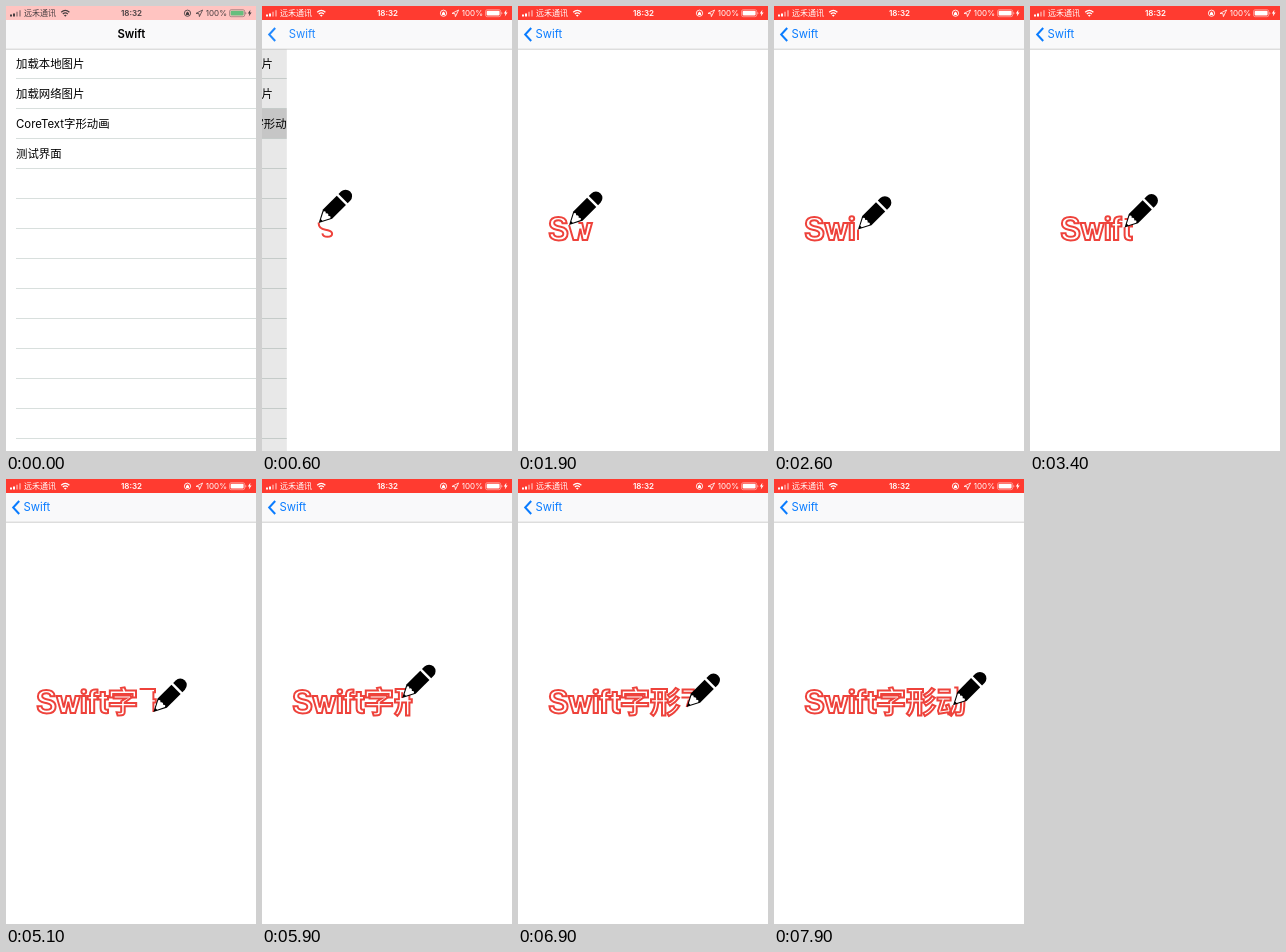
An HTML page for the animation above (8000 ms loop, 250 by 445 pixels).

```html
<!DOCTYPE html>
<html lang="zh-CN">
<head>
<meta charset="utf-8">
<title>Glyph drawing</title>
<style>
html, body { margin: 0; width: 100%; height: 100%; overflow: hidden; background: #fff; }
svg { display: block; width: 100%; height: 100%; font-family: Inter, "Noto Sans CJK SC", "Noto Sans CJK", sans-serif; }
#list text { font-size: 11.4px; }
#nav text { font-size: 11.3px; }
#status { font-size: 8px; fill: currentColor; }
#glyphs path { fill: none; stroke: #ee423b; stroke-width: 2; }
</style>
</head>
<body>
<svg viewBox="0 0 250 445">
  <g id="list">
    <rect y="43" width="250" height="402" fill="#fff"/>
    <rect id="pressed" y="103" width="250" height="30" fill="#d9d9d9"/>
    <g id="lines" stroke="#d8dfdd"></g>
    <text x="10" y="62">加载本地图片</text>
    <text x="10" y="92">加载网络图片</text>
    <text x="10" y="122">CoreText字形动画</text>
    <text x="10" y="152">测试界面</text>
  </g>
  <rect id="dim" y="43" width="250" height="402"/>

  <g id="page">
    <rect y="43" width="250" height="402" fill="#fff"/>
    <g id="glyphs">
      <!-- S -->
      <path d="M35.6 227.3C36 229.6 38 230.8 40.6 230.8C43.6 230.8 45.3 229.6 45.3 227.7C45.3 225.9 44 225 41 224.3L38.6 223.8C34 222.8 31.9 220.9 31.9 217.4C31.9 213.4 35.2 210.9 40.3 210.9C45.3 210.9 48.5 213.4 48.7 217.2H44.5C44.2 215.4 42.7 214.3 40.3 214.3C37.7 214.3 36.2 215.4 36.2 217.1C36.2 218.7 37.4 219.6 40.4 220.2L42.8 220.7C47.5 221.7 49.6 223.8 49.6 227.4C49.6 231.8 46.2 234.4 40.6 234.4C35.1 234.4 31.6 231.7 31.4 227.3Z"/>
      <!-- w -->
      <path d="M60.4 217H64.2L66.9 228.6L69.5 217H74L69.2 234H64.7L62.3 222.8L59.9 234H55.4L50.5 217H55.1L57.8 228.6Z"/>
      <!-- i -->
      <path d="M75.7 217H79.9V234H75.7Z"/>
      <path d="M75.4 212.6a2.4 2.4 0 0 1 4.8 0a2.4 2.4 0 0 1 -4.8 0Z"/>
      <!-- f -->
      <path d="M84 234V220.4H81.6V217H84V215.6C84 212 86 210.4 89.3 210.4C90.2 210.4 91 210.5 91.5 210.6V213.7C91.1 213.6 90.6 213.6 90.1 213.6C88.8 213.6 88.2 214.2 88.2 215.5V217H91.4V220.4H88.2V234Z"/>
      <!-- t -->
      <path d="M94.6 213H98.9V217H102V220.4H98.9V228.6C98.9 230 99.6 230.8 100.9 230.8L102 230.7V234C101.5 234.1 100.7 234.2 99.7 234.2C96 234.2 94.6 232.7 94.6 229.3V220.4H92.3V217H94.6Z"/>
      <!-- 字 -->
      <path d="M115 209L118.6 208.3L119.8 211.6H130V218.6H126.6V214.9H107.2V218.6H103.8V211.6H116Z"/>
      <path d="M103.6 227.2V224H115.2V222.2L119.6 219.6H107.6V216.6H124.6L125.4 218.6L118.7 223.4V224H130.2V227.2H118.7V233C118.7 236 117.6 236.6 111.6 236.4L110.6 233.3C114.6 233.5 115.2 233.4 115.2 232.4V227.2Z"/>
      <!-- 形 -->
      <path d="M133.6 210H149V213.2H147.4V220.2H149.8V223.4H147.4V236.4H144V223.4H140.2C140 229.5 138.6 233.4 135.4 236.8L132.8 234.6C135.5 231.8 136.6 228.6 136.8 223.4H133V220.2H136.9V213.2H133.6Z"/>
      <path d="M140.2 213.2V220.2H144V213.2Z"/>
      <path d="M157.6 209L160.6 210.6C158.4 213.8 155 216.6 151.6 218.4L149.8 215.8C153 214.2 156 211.7 157.6 209Z"/>
      <path d="M158 217.2L161 218.8C158.8 222 155.4 224.8 152 226.6L150.2 224C153.4 222.4 156.4 219.9 158 217.2Z"/>
      <path d="M158.4 225.6L161.4 227C158.6 231.6 155 235 150.8 237L149.2 234.2C153.2 232.4 156.6 229.4 158.4 225.6Z"/>
      <!-- 动 -->
      <path d="M164.6 210.6H175.8V213.8H164.6Z"/>
      <path d="M163.4 218.4H176.6V221.6H170.6L167.6 231.2L173.2 230.4L171.8 226.4L174.6 225.4L177.4 234.2L174.4 235.2L173.9 233.3L164.8 234.8L164 231.8L167.2 221.6H163.4Z"/>
      <path d="M180.2 208.4H183.5V214.6H190.6C190.5 226 190.2 231.6 189.4 234C188.6 236.6 187 236.8 182.2 236.4L181.4 233.2C185.4 233.5 186 233.4 186.4 232.2C186.9 230.2 187.1 226 187.2 217.8H183.4C183 227 181.4 232.6 177.2 237L174.6 234.8C178.4 230.8 179.7 226 180.1 217.8H176.8V214.6H180.2Z"/>
    </g>
    <g id="pen">
      <g transform="rotate(-45)">
        <path d="M0 0L12.5 -6.5H32V6.5H12.5Z"/>
        <path d="M4.2 -1L11.6 -4.8Q14.2 -3.6 11.8 -1.8Q14.4 0 11.8 1.8Q14.2 3.6 11.6 4.8L4.2 1Z" fill="#fff"/>
        <path d="M34.5 -6.5H38A6.5 6.5 0 0 1 38 6.5H34.5Z"/>
      </g>
    </g>
  </g>

  <g id="nav">
    <rect y="14" width="250" height="29" fill="#f9f9fa"/>
    <path d="M0 43.2H250" stroke="#b9b9bb" stroke-width=".7"/>
    <path id="chevron" d="M13.2 22L7.2 28.5L13.2 35" fill="none" stroke="#0a7cff" stroke-width="2"/>
    <g id="label">
      <text id="title" y="32.4" font-weight="600">Swift</text>
      <text id="back" y="32.4" fill="#0a7cff">Swift</text>
    </g>
  </g>

  <rect id="bar" width="250" height="14"/>
  <g id="status">
    <path d="M4 8.6h2v2h-2zM7 7.4h2v3.2h-2z"/>
    <path d="M10 5.8h2v4.8h-2zM13 4.2h2v6.4h-2z" opacity=".4"/>
    <text x="18" y="10.2">远禾通讯</text>
    <g fill="none" stroke="currentColor" stroke-width="1.2">
      <path d="M55.2 6.2Q59.3 2.4 63.4 6.2M56.8 8Q59.3 5.7 61.8 8"/>
      <circle cx="181.5" cy="7.2" r="3.1" stroke-width=".9"/>
    </g>
    <path d="M57.9 9.3Q59.3 8.1 60.7 9.3L59.3 10.8Z"/>
    <path d="M180 6.8h3v2.2h-3zM180.7 6.8v-1h1.6v1z"/>
    <path d="M190 7.4L196.6 4L193.4 10.6L193 7.7Z" fill="none" stroke="currentColor" stroke-width=".8"/>
    <text x="125.5" y="10.1" text-anchor="middle" font-weight="600">18:32</text>
    <text x="221" y="10.1" text-anchor="end">100%</text>
    <rect x="223.5" y="3.7" width="15.2" height="7" rx="1.8" fill="none" stroke="currentColor" stroke-width=".7" opacity=".6"/>
    <path d="M239.4 6v2.4q1 -.3 1 -1.2t-1 -1.2z" opacity=".6"/>
    <rect id="charge" x="224.6" y="4.8" width="13" height="4.8" rx="1"/>
    <path d="M244.4 3.8L241.8 7.6H243.4L242.8 10.6L245.6 6.6H244Z"/>
  </g>
</svg>
<script>
const LOOP = 8000, STEP = 100;
const $ = id => document.getElementById(id);
const clamp = v => Math.min(1, Math.max(0, v));
const mix = (a, b, p) => `rgb(${a.map((v, i) => Math.round(v + (b[i] - v) * p))})`;
const shift = (id, x, y = 0) => $(id).setAttribute("transform", `translate(${x} ${y})`);

const WHITE = [255, 255, 255], RED = [255, 59, 48], DARK = [70, 62, 64], GREEN = [104, 190, 126];

$("lines").innerHTML = Array.from({ length: 13 }, (_, i) =>
  `<path d="M10 ${72.5 + 30 * i}H250"/>`).join("");

// Contours are drawn one after another, each starting where the last one ended.
let total = 0;
const contours = [...document.querySelectorAll("#glyphs path")].map(el => {
  const len = el.getTotalLength(), start = total;
  total += len;
  return { el, len, start };
});

// time, contour, share of that contour
const keys = [
  [380, 0, 0], [600, 0, .268], [1900, 1, .762], [3400, 5, .8],
  [4400, 7, .78], [5900, 9, .27], [7900, 15, .81], [8000, 15, .92]
].map(([t, i, part]) => [t, contours[i].start + contours[i].len * part]);

function drawnAt(t) {
  if (t <= keys[0][0]) return 0;
  const i = keys.findIndex(k => k[0] >= t);
  const [t0, a] = keys[i - 1], [t1, b] = keys[i];
  return a + (b - a) * (t - t0) / (t1 - t0);
}

function pushAt(t) {
  if (t >= 1000) return 1;
  const x = 13 * Math.max(0, t - 300) / 1000;
  return 1 - (1 + x) * Math.exp(-x);
}

function drawGlyphs(t) {
  const drawn = drawnAt(t);
  let tip = contours[0].el.getPointAtLength(0);
  for (const { el, len, start } of contours) {
    const part = Math.min(len, Math.max(0, drawn - start));
    el.style.display = part > 0 ? "" : "none";
    el.style.strokeDasharray = part < len ? `${part} ${len + 9}` : "none";
    if (part > 0) tip = el.getPointAtLength(part);
  }
  shift("pen", tip.x, tip.y);
}

function render(t) {
  const push = pushAt(t), glow = clamp(.3 + t / 500), light = clamp(t / 300);
  $("bar").style.fill = mix(WHITE, RED, glow);
  $("status").style.color = mix(DARK, WHITE, light);
  $("charge").style.fill = mix(GREEN, WHITE, light);

  $("pressed").style.display = t >= 200 ? "" : "none";
  shift("list", -75 * push);
  $("dim").style.opacity = .1 * push;
  shift("page", 250 * (1 - push));

  shift("label", 111.5 + (17.5 - 111.5) * push);
  $("title").style.opacity = clamp(1 - push * 1.6);
  $("back").style.opacity = push;
  $("chevron").style.opacity = push;
  drawGlyphs(t);
}

const begin = performance.now();
function tick() {
  const t = (performance.now() - begin) % LOOP;
  render(Math.floor(t / STEP) * STEP);
  requestAnimationFrame(tick);
}
tick();
</script>
</body>
</html>
```
